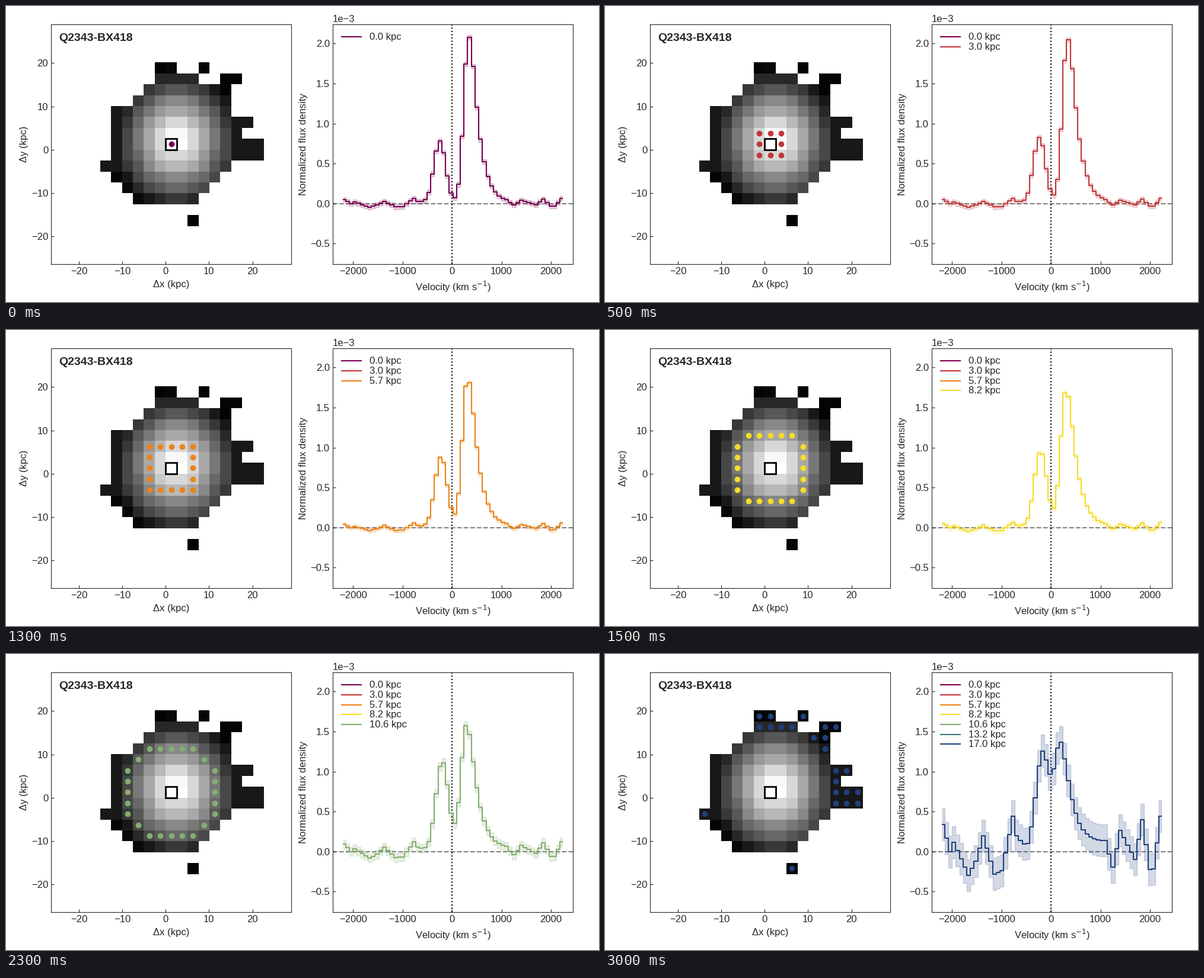
A matplotlib script for the animation above (3.5 s loop, 1000 px wide and 500 px high).

```python
import matplotlib.pyplot as plt
import numpy as np
from matplotlib.animation import FuncAnimation

W, H = 1000, 500
INK = "0.15"
CELL = 2.515  # kpc per map cell
COL0, ROW0 = 6, 7  # central cell

plt.rcParams.update({
    "font.family": "Liberation Sans", "font.size": 12,
    "text.color": INK, "axes.labelcolor": INK, "axes.edgecolor": INK,
    "xtick.color": INK, "ytick.color": INK,
    "xtick.direction": "in", "ytick.direction": "in",
    "axes.linewidth": 0.8,
})

fig = plt.figure(figsize=(W / 100, H / 100), dpi=100, facecolor="white")


def panel(left, top=31, size=405):
    return fig.add_axes([left / W, 1 - (top + size) / H, size / W, size / H])


sky = panel(76)
spec = panel(551)

# Halo shape: a trimmed disc plus outlying clumps given as (row, first, last)
CLUMPS = [(0, 5, 6), (0, 9, 9), (1, 5, 8), (1, 11, 12), (2, 10, 11), (3, 11, 11), (4, 1, 1),
          (5, 12, 13), (6, 12, 12), (7, 12, 14), (8, 12, 14), (9, 0, 0), (14, 8, 8)]
cols, rows = np.meshgrid(np.arange(15), np.arange(15))
dx, dy = cols - COL0, rows - ROW0
distance = np.hypot(dx, dy)
halo = (distance < 6) & (abs(dx + dy) < 8)
for row, first, last in CLUMPS:
    halo[row, first:last + 1] = True

# Brightness falls linearly from a centre between cells, in steps of 16 greys
height = 0.9 * (rows - 6.6)
grey = 285 - 47 * np.hypot(cols - 6.5, height)
grey = np.maximum(grey, np.where(abs(height) < 2.9, 24, 0))
grey = np.where(grey > 0, grey // 16 * 16 + 8, 4)

sky.pcolormesh((np.arange(16) - COL0) * CELL, (ROW0 + 1 - np.arange(16)) * CELL,
               np.ma.masked_where(~halo, grey), cmap="gray", vmin=0, vmax=255)
sky.add_patch(plt.Rectangle((0, 0), CELL, CELL, fill=False, ec="black", lw=2, zorder=3))
limits = -10.5 * CELL, 11.5 * CELL
sky.set(xlim=limits, ylim=limits, xticks=range(-20, 21, 10), yticks=range(-20, 21, 10))
sky.set_xlabel("Δx (kpc)", labelpad=5)
sky.set_ylabel("Δy (kpc)", labelpad=3.5)
fig.text(89 / W, 1 - 59 / H, "Q2343-BX418", size=14, weight="bold")

spec.axhline(0, color="gray", ls="--", lw=1.5, zorder=1)
spec.axvline(0, color="black", ls=":", lw=1.5, zorder=1.5)
spec.set(xlim=(-2413, 2442), ylim=(-0.756e-3, 2.24e-3),
         xticks=range(-2000, 2001, 1000), yticks=np.arange(-1, 5) * 0.5e-3)
spec.set_xlabel("Velocity (km s$^{-1}$)", labelpad=5)
spec.set_ylabel("Normalized flux density", labelpad=3.5)
spec.ticklabel_format(axis="y", style="sci", scilimits=(0, 0))

velocity = np.linspace(-2192, 2221, 60)
channel = np.arange(60)

# Noise pattern common to all rings, in units of their error: (channel, value)
RIPPLE = [(0, 1.7), (2, 0), (3, 0.6), (7, -1.5), (9, -0.6), (11, 1), (14, -1.4), (16, -1.2),
          (19, 2.2), (20, 1), (23, 0), (44, 0.6), (46, -1), (48, 1.3), (52, -0.5),
          (54, 2), (56.5, -1.9), (59, 2.2)]
ripple = np.interp(channel, *zip(*RIPPLE))


def gauss(x, sigma):
    return np.exp(-0.5 * (x / sigma) ** 2)


def red_peak(x, n):
    """Steep Gaussian rise followed by a rounded exponential tail."""
    tail = np.exp(-(np.hypot(x, 1.5) - 1.5) / (2.1 + 0.07 * n))
    return np.where(x < 0, gauss(x, 1.33 + 0.05 * n), tail)


ring_artists = []
legend_artists = []


def add_ring(radius, color, blue, red, red_channel, error):
    """Add the dots, spectrum and legend entry of the next ring outwards."""
    n = len(ring_artists)
    ring = halo & (distance >= n) & (distance < (n + 1 if n < 6 else np.inf))
    dots, = sky.plot((dx[ring] + 0.5) * CELL, (0.5 - dy[ring]) * CELL, "o",
                     color=color, ms=7, mew=0, zorder=4)

    flux = (blue * gauss(channel - 25.95 - 0.17 * n, 1.6 + 0.03 * n)
            + red * red_peak(channel - red_channel, n) + error * ripple) * 1e-3
    error *= 1e-3
    line, = spec.plot(velocity, flux, color=color, lw=1.5, drawstyle="steps-mid", zorder=3)
    band = spec.fill_between(velocity, flux - error, flux + error, step="mid",
                             color=color, alpha=0.2, zorder=2)
    ring_artists.append((dots, line, band))

    drop = n * 16.67
    y = 1 - (52.2 + drop) / H
    key = plt.Line2D([566 / W, 599.3 / W], [y, y], color=color, lw=1.5,
                     transform=fig.transFigure)
    fig.add_artist(key)
    label = fig.text(613 / W, 1 - (57.3 + drop) / H, f"{radius:.1f} kpc")
    legend_artists.append((key, label))


add_ring(0.0, "#780050", 0.78, 2.08, 33.80, 0.03)
add_ring(3.0, "#c13639", 0.83, 2.06, 33.75, 0.03)
add_ring(5.7, "#ea8419", 0.89, 1.87, 33.50, 0.025)
add_ring(8.2, "#f7dc28", 0.96, 1.72, 33.35, 0.03)
add_ring(10.6, "#84ae70", 1.13, 1.57, 33.20, 0.055)
add_ring(13.2, "#387878", 1.25, 1.40, 33.05, 0.085)
add_ring(17.0, "#20407c", 1.22, 1.30, 31.80, 0.20)


def update(step):
    """Show one ring at a time while the legend keeps growing."""
    changed = []
    for n, (ring, entry) in enumerate(zip(ring_artists, legend_artists)):
        for artist in ring:
            artist.set_visible(n == step)
        for artist in entry:
            artist.set_visible(n <= step)
        changed += [*ring, *entry]
    return changed


anim = FuncAnimation(fig, update, frames=len(ring_artists), interval=500,
                     repeat=True, repeat_delay=0, blit=False)
plt.show()
```
